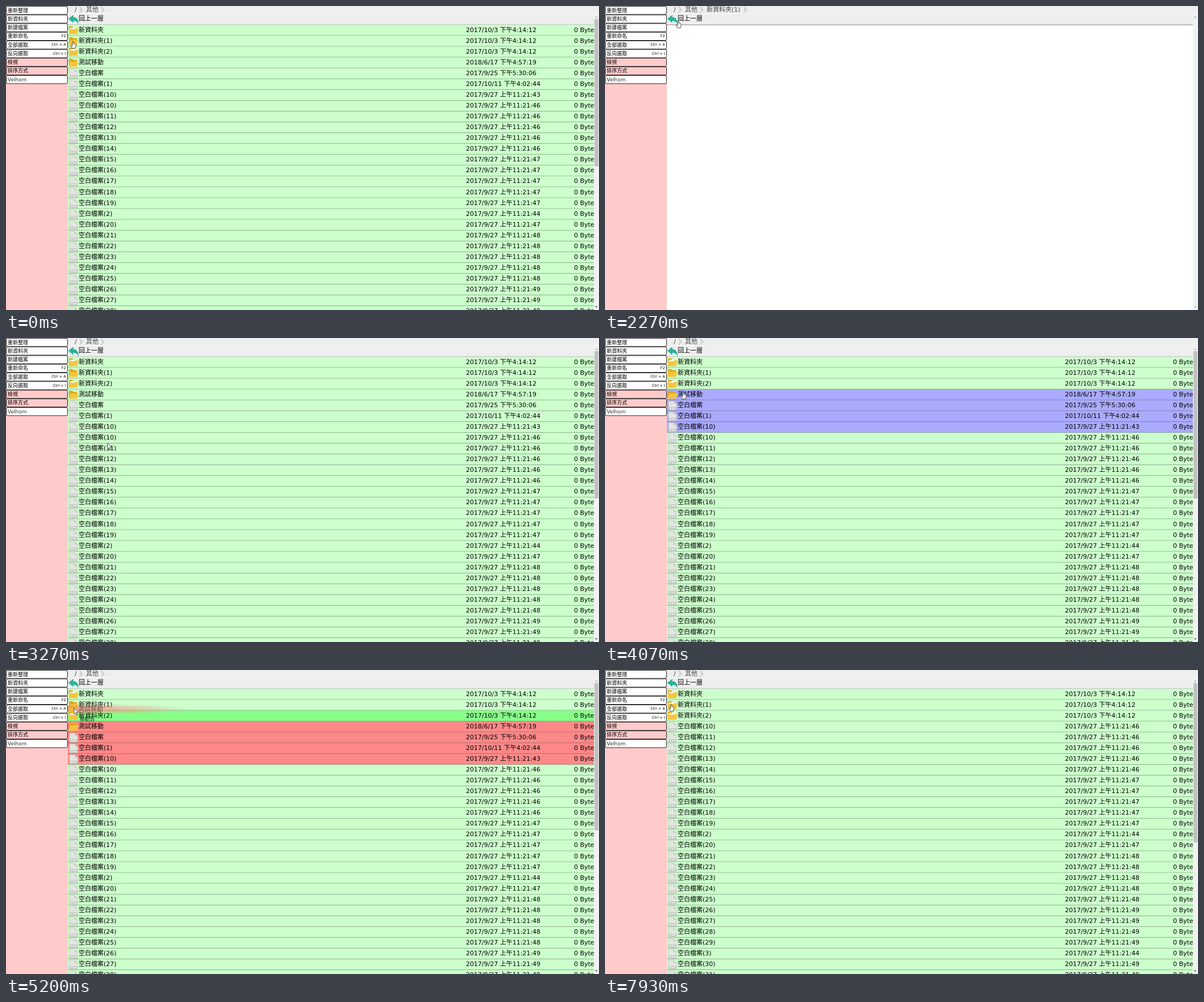
An HTML page with a canvas that plays this animation: 1045 by 536 pixels, repeating every 8 s.

```html
<!DOCTYPE html>
<html>
<head>
<meta charset="utf-8">
<style>
html, body { margin: 0; width: 100%; height: 100%; overflow: hidden; background: #fff; }
canvas { display: block; }
</style>
</head>
<body>
<canvas id="stage" width="1045" height="536"></canvas>
<script>
const ctx = document.getElementById('stage').getContext('2d');
const FAMILY = '"DejaVu Sans", "Noto Sans CJK TC", "Noto Sans CJK JP", "Noto Sans CJK", sans-serif';
const TOP = 33.2, ROW = 19.07, LEFT = 109, RIGHT = 1036;
const LOOP = 8000, STEP = 200 / 3;

// Pointer stops: step, x, y
const path = [
  [0, 118, 62], [12, 118, 62], [19, 120, 23], [27, 120, 23], [30, 133, 43], [32, 133, 43],
  [34, 129, 26], [38, 129, 26], [47, 179, 189], [49, 179, 185], [51, 173, 160], [58, 138, 95],
  [61, 138, 95], [68, 121, 97], [69, 121, 97], [73, 118, 34], [76, 120, 76], [78, 120, 67],
  [80, 116, 64], [90, 116, 64], [94, 144, 83], [105, 144, 83], [117, 117, 60.5], [118, 117, 60.5],
  [119, 116.5, 60]
];

const menu = [
  ['重新整理'], ['新資料夾'], ['新建檔案'], ['重新命名', 'F2'], ['全部選取', 'Ctrl + A'],
  ['反向選取', 'Ctrl + I'], ['檢視'], ['排序方式'], ['Velhom']
];

const folder = (name, date, full) => ({ name, date, full, folder: true });
const files = [
  folder('新資料夾', '2017/10/3 下午4:14:12', true),
  folder('新資料夾(1)', '2017/10/3 下午4:14:12', false),
  folder('新資料夾(2)', '2017/10/3 下午4:14:12', true),
  folder('測試移動', '2018/6/17 下午4:57:19', false),
  { name: '空白檔案', date: '2017/9/25 下午5:30:06' },
  { name: '空白檔案(1)', date: '2017/10/11 下午4:02:44' },
  { name: '空白檔案(10)', date: '2017/9/27 上午11:21:43' }
];
const addFile = n => {
  const sec = n < 10 ? 44 : n < 15 ? 46 : n < 21 ? 47 : n < 26 ? 48 : 49;
  files.push({ name: `空白檔案(${n})`, date: '2017/9/27 上午11:21:' + sec });
};
for (let n = 10; n < 32; n++) {
  if (n % 10 === 0 && n > 10) addFile(n / 10);
  addFile(n);
}
const moved = files.filter((f, i) => i < 3 || i > 6)
  .map((f, i) => i === 1 ? { ...f, full: true } : f);

function text(s, x, y, size = 11, color = '#000', align = 'left') {
  ctx.font = `${size}px ${FAMILY}`;
  ctx.textAlign = align;
  ctx.fillStyle = color;
  ctx.fillText(s, x, y);
}

function rect(x, y, w, h, color) {
  ctx.fillStyle = color;
  ctx.fillRect(x, y, w, h);
}

function poly(points, fill, stroke, width = 0.8) {
  ctx.beginPath();
  for (let i = 0; i < points.length; i += 2) ctx.lineTo(points[i], points[i + 1]);
  ctx.closePath();
  if (fill) { ctx.fillStyle = fill; ctx.fill(); }
  if (stroke) { ctx.strokeStyle = stroke; ctx.lineWidth = width; ctx.stroke(); }
}

function at(x, y, draw) {
  ctx.save();
  ctx.translate(x, y);
  draw();
  ctx.restore();
}

function folderIcon(x, y, full) {
  at(x, y, () => {
    poly([1, 2, 7, 2, 8.5, 4, 15, 4, 15, 15, 1, 15], '#e3a81f');
    if (full) poly([2.5, 5, 16, 3.5, 16, 12, 2.5, 13], '#fafaf2');
    poly(full ? [0.5, 7, 11, 7, 13, 5.5, 17.5, 5.5, 15.5, 16, 1, 16]
              : [3.5, 7, 17.5, 7, 15, 16, 0.5, 16], '#f3c63c');
  });
}

function fileIcon(x, y) {
  at(x, y, () => {
    poly([2, 1.5, 11, 1.5, 16, 6, 16, 17, 2, 17], '#e4e4e0', '#bfc7bd', 0.7);
    poly([11, 1.5, 11, 6, 16, 6], '#c5cdc5');
    rect(2.5, 12, 13, 4.5, '#c4c4c4');
    for (let i = 0; i < 3; i++) rect(4.5 + i * 3.5, 13.5, 2, 1.7, '#fff');
  });
}

function sidebar() {
  rect(0, 0, LEFT, 536, '#ffcaca');
  menu.forEach(([label, key], i) => {
    const y = i * 15.25;
    ctx.beginPath();
    ctx.roundRect(0.5, y + 0.5, 108, 14.4, 2.5);
    ctx.fillStyle = i === 6 || i === 7 ? '#ffcaca' : '#fff';
    ctx.fill();
    ctx.strokeStyle = '#222';
    ctx.lineWidth = 1;
    ctx.stroke();
    text(label, 3, y + 10.6, 9, i === 8 ? '#333' : '#000');
    if (key) text(key, 105.5, y + 9.4, 6.4, '#000', 'right');
  });
}

function crumb(label, x, tip) {
  text(label, x, 10.4, 11, '#444');
  poly([tip, 0, tip + 6.5, 6.5, tip, 13, tip - 1, 13, tip + 1, 6.5, tip - 1, 0], '#d4d4d4');
}

function header(inside) {
  rect(LEFT, 0, 936, TOP, '#eee');
  rect(LEFT, 13, 936, 1, '#f8f8f8');
  crumb('/', 121, 130);
  crumb('其他', 141, 168);
  if (inside) crumb('新資料夾(1)', 179, 245);
  ctx.beginPath();
  ctx.moveTo(110, 22.5);
  ctx.lineTo(118.5, 15.5);
  ctx.lineTo(118.5, 19.5);
  ctx.quadraticCurveTo(127.5, 20, 128, 32);
  ctx.quadraticCurveTo(125, 26, 118.5, 26);
  ctx.lineTo(118.5, 30);
  ctx.fillStyle = '#29b39b';
  ctx.fill();
  text('回上一層', 128, 26.2);
  rect(LEFT, 32.7, RIGHT - LEFT, 1, '#858585');
}

function scrollbar(thumb) {
  rect(RIGHT, 14, 9, 522, '#f1f1f1');
  if (thumb) rect(1037, 23, 7, thumb, '#c1c1c1');
  poly([1038, 20.5, 1042.4, 20.5, 1040.2, 18], '#a3a3a3');
  poly([1038, 529.5, 1042.4, 529.5, 1040.2, 532], thumb ? '#505050' : '#a3a3a3');
}

function listing(items, color) {
  items.forEach((f, i) => {
    const y = TOP + i * ROW;
    if (y > 536) return;
    rect(LEFT, y, RIGHT - LEFT, ROW, color(i));
    f.folder ? folderIcon(110, y + 0.5, f.full) : fileIcon(110, y + 0.5);
    text(f.name, 128, y + 12.3);
    text(f.date, 810.5, y + 12.3);
    text('0 Byte', 1001, y + 12.3);
    rect(LEFT, y + ROW - 0.6, RIGHT - LEFT, 1, 'rgba(0,0,0,.5)');
  });
}

function ghost(x, y) {
  at(x, y + 2, () => {
    ctx.save();
    ctx.scale(1, 0.045);
    const glow = ctx.createRadialGradient(0, 0, 20, 0, 0, 215);
    glow.addColorStop(0, 'rgba(255,128,128,.75)');
    glow.addColorStop(1, 'rgba(255,128,128,0)');
    rect(-11, -215, 230, 430, glow);
    ctx.restore();
    ctx.globalAlpha = 0.5;
    folderIcon(-11, -9, false);
    text('測試移動', 7, 4);
    ctx.globalAlpha = 1;
    text('移動到', 10, 21, 8.7, '#222');
  });
}

function pointer(x, y, arrow) {
  at(x, y, () => {
    ctx.lineJoin = 'round';
    if (arrow) {
      poly([0, 0, 0, 10.5, 2.4, 8.3, 4.2, 12.2, 5.8, 11.5, 4.1, 7.8, 7.4, 7.6], '#fff', '#222');
      return;
    }
    poly([-1, 0.8, 0, 0.2, 1, 0.8, 1, 4.2, 2.6, 4.2, 4, 5, 5, 5.6, 5, 8.6, 4, 12.6,
      -1.6, 12.6, -3.8, 8.4, -3.4, 7.2, -2.4, 7.2, -1, 8.6], '#fff', '#222');
  });
}

function pointerAt(n) {
  const i = Math.max(1, path.findIndex(p => p[0] >= n));
  const [a, x0, y0] = path[i - 1], [b, x1, y1] = path[i];
  const k = (n - a) / (b - a);
  return [x0 + (x1 - x0) * k, y0 + (y1 - y0) * k];
}

function draw(n) {
  const inside = n >= 6 && n < 36;
  const dragging = n >= 70 && n < 86;
  const done = n >= 106;
  const [x, y] = pointerAt(n);

  // The drop target lags one step behind the pointer.
  let target = -1;
  if (dragging) target = Math.floor((pointerAt(n - 1)[1] - TOP) / ROW);
  else if (n >= 86 && !done) target = 1;

  const color = i => {
    if (n >= 61 && !done && i > 2 && i < 7) return dragging ? '#ff8888' : '#aaaaff';
    return i === target ? '#88ff88' : '#ccffcc';
  };

  rect(0, 0, 1045, 536, '#fff');
  sidebar();
  header(inside);
  if (!inside) listing(done ? moved : files, color);
  scrollbar(inside ? 0 : done ? 281 : 260);
  if (dragging) ghost(x, y);
  const arrow = (inside && y > 33) || (n >= 39 && n <= 51) || (n >= 70 && n <= 90);
  pointer(x, y, arrow);
}

function tick() {
  const t = performance.now() % LOOP;
  draw(Math.min(119, Math.floor((t + 4) / STEP)));
  requestAnimationFrame(tick);
}
tick();
</script>
</body>
</html>
```
